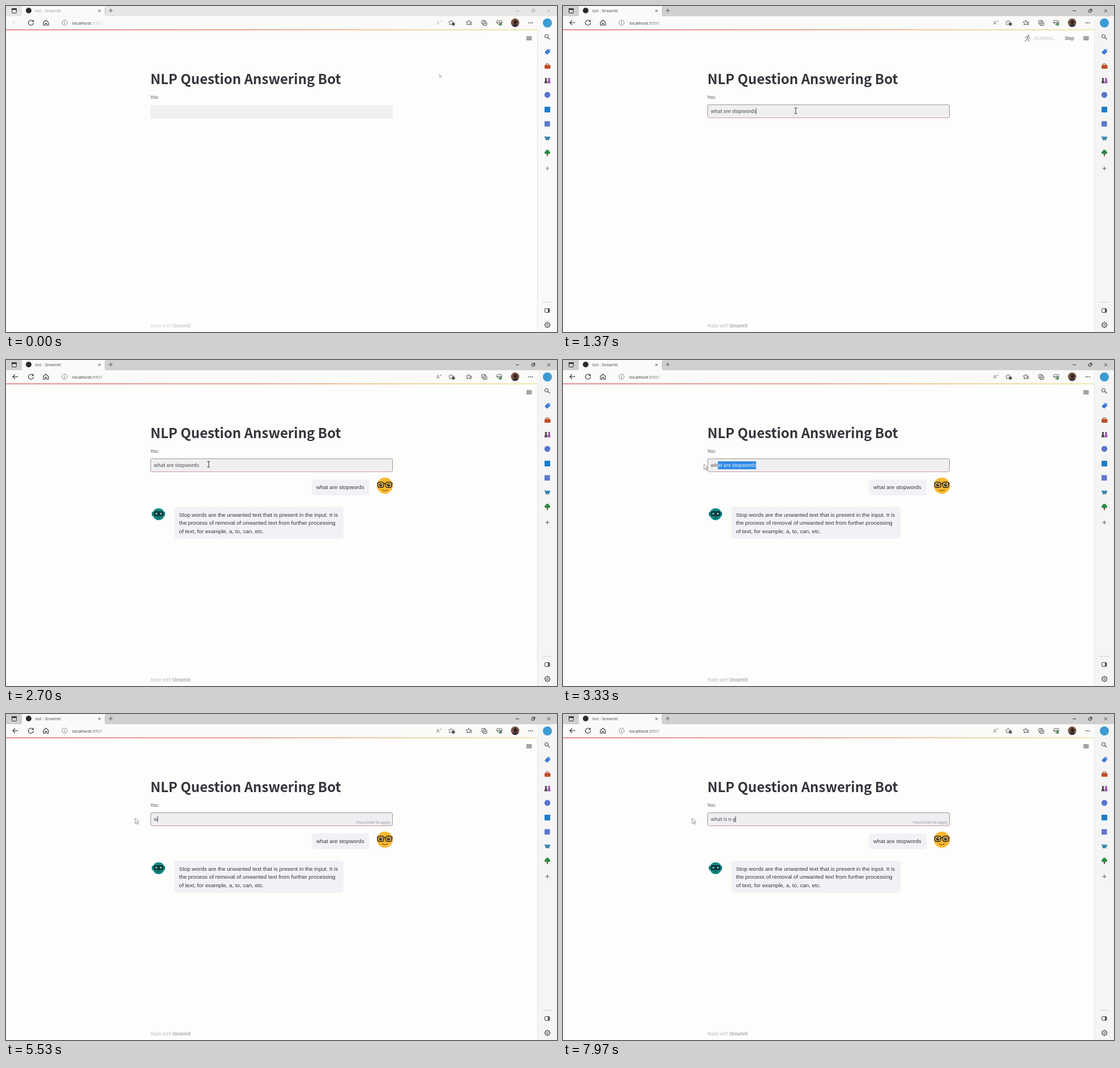
An HTML page with a canvas for the animation above (8 s loop, 973 by 576 pixels).

```html
<!DOCTYPE html>
<html lang="en">
<head>
<meta charset="utf-8">
<title>NLP Question Answering Bot</title>
<style>
html, body { margin: 0; width: 100%; height: 100%; overflow: hidden; background: #fdfdfc; }
canvas { display: block; width: 973px; height: 576px; }
</style>
</head>
<body>
<canvas id="stage" width="973" height="576"></canvas>
<script>
const W = 973, H = 576, LOOP = 8000;
const ctx = document.getElementById('stage').getContext('2d');
const UI = '"Open Sans", "Noto Sans", sans-serif';
const CHAT = '"Liberation Sans", Arial, sans-serif';
const INK = '#34343b', ICON = '#444', PAPER = '#fdfdfc';
const QUESTION = 'what are stopwords', NEXT = 'what is n-g';
const ANSWER = [
  'Stop words are the unwanted text that is present in the input. It is',
  'the process of removal of unwanted text from further processing',
  'of text, for example, a, to, can, etc.'
];
const ENTER = 690, REPLY = 2500, RETYPE = 5500;

// Page text: CSS pixels at the zoom of the recorded window.
const ZOOM = 0.546;
const pageFont = (px, weight = 'normal') =>
  `${weight} ${px * ZOOM}px "Noto Sans CJK SC", "Noto Sans CJK JP", "Noto Sans CJK", Lato, sans-serif`;
const INPUT_FONT = pageFont(16), SMALL_FONT = pageFont(14);

const clamp = (v, lo = 0, hi = 1) => Math.min(hi, Math.max(lo, v));
const ease = p => p * p * (3 - 2 * p);

// Eased value of [time, ...values] keys at time t.
function track(keys, t) {
  let i = 0;
  while (i < keys.length - 2 && t >= keys[i + 1][0]) i++;
  const [t0, ...a] = keys[i], [t1, ...b] = keys[i + 1];
  const p = ease(clamp((t - t0) / (t1 - t0)));
  return a.map((v, k) => v + (b[k] - v) * p);
}

const POINTER = [
  [0, 765, 120], [130, 765, 120], [320, 411, 185], [1500, 411, 185],
  [2000, 478, 178], [2300, 478, 178], [2800, 344, 185], [2950, 344, 185],
  [3330, 249, 184], [3550, 228, 184]
];
const SELECT = [[2950, 18], [3330, 2], [3420, 0]];

function rect(x, y, w, h, color) {
  ctx.fillStyle = color;
  ctx.fillRect(x, y, w, h);
}
function round(x, y, w, h, r, fill, stroke) {
  ctx.beginPath();
  ctx.roundRect(x, y, w, h, r);
  if (fill) { ctx.fillStyle = fill; ctx.fill(); }
  if (stroke) { ctx.strokeStyle = stroke; ctx.lineWidth = 1; ctx.stroke(); }
}
function disc(x, y, r, color) {
  ctx.beginPath();
  ctx.arc(x, y, r, 0, 7);
  ctx.fillStyle = color;
  ctx.fill();
}
function text(str, x, y, font, color) {
  ctx.font = font;
  ctx.fillStyle = color;
  ctx.fillText(str, x, y);
}
function textWidth(str, font) {
  ctx.font = font;
  return ctx.measureText(str).width;
}
// Path drawn around the point (x, y).
function shape(x, y, d, { fill, stroke, width = 1 }) {
  const p = new Path2D(d);
  ctx.save();
  ctx.translate(x, y);
  if (fill) { ctx.fillStyle = fill; ctx.fill(p); }
  if (stroke) { ctx.strokeStyle = stroke; ctx.lineWidth = width; ctx.stroke(p); }
  ctx.restore();
}
const line = (x, y, d, color = ICON, width = 1) => shape(x, y, d, { stroke: color, width });
const solid = (x, y, d, color) => shape(x, y, d, { fill: color });
function faded(alpha, draw) {
  ctx.save();
  ctx.globalAlpha *= alpha;
  draw();
  ctx.restore();
}

const STAR = 'M-1-4.5L.4-1.6L3.6-1.3L1.2.9L2 4L-1 2.4L-4 4L-3.2.9L-5.6-1.3L-2.4-1.6Z';
const CROSS = 'M-2.5-2.5L2.5 2.5M2.5-2.5L-2.5 2.5';
const PLUS = 'M-3.5 0H3.5M0-3.5V3.5';

function drawTabs(sharp) {
  const v = Math.round(230 - 22 * sharp);
  rect(0, 0, W, 18, `rgb(${v},${v},${v})`);
  round(28, -4, 147, 23, 3, '#fafaf8');
  rect(0, 18, W, 24, '#fafaf8');
  round(10.5, 4.5, 8, 8, 1.5, null, '#333');
  rect(10, 4, 9, 3, '#333');
  disc(40, 8, 5, '#2b2b2b');
  faded(0.5 + 0.5 * sharp, () => text('bot - Streamlit', 52, 10.7, '6.8px ' + UI, '#444'));
  line(165, 8.5, 'M-2-2L2 2M2-2L-2 2', '#444');
  rect(174.5, 3, 1, 12, '#bbb');
  line(185, 8, PLUS, '#555');
  faded(0.3 + 0.7 * sharp, () => {
    line(903, 8.5, 'M-3 0H3', '#333');
    line(931, 8.5, 'M-2.5-1.5H1.5V2.5H-2.5ZM-1-3H3V1', '#333');
    line(958.5, 8.5, CROSS, '#333');
  });
}

function drawToolbar(sharp) {
  faded(0.1 + 0.9 * sharp, () => line(16.5, 29.5, 'M5 0H-4.5M-.5-4L-4.5 0L-.5 4', '#333', 1.1));
  line(44, 29.5, 'M3.8-2.4A4.5 4.5 0 1 0 4.5 0M4.2-5V-2H1.2', '#333', 1.1);
  line(70.5, 29.5, 'M-4.5-.5L0-4.5L4.5-.5V4.5H1.3V1H-1.3V4.5H-4.5Z', '#333', 1.1);
  line(103.5, 29.5, 'M4.5 0A4.5 4.5 0 1 1-4.5 0A4.5 4.5 0 1 1 4.5 0M0-.8V2.4M0-2.6V-1.7', '#777', 0.9);
  const font = '8px ' + UI;
  text('localhost', 117, 32.5, font, '#333');
  faded(0.4 + 0.6 * sharp, () => text(':8501', 117 + textWidth('localhost', font), 32.5, font, '#777'));

  faded(0.4 + 0.6 * sharp, () => {
    text('A', 760, 33, '8.5px ' + UI, '#666');
    line(767.5, 27, 'M-1.8 1L0-1L1.8 1', '#666', 0.8);
  });
  line(787, 29.5, STAR, '#666', 0.9);
  disc(790, 32, 2.8, '#555');
  line(818, 29.5, STAR, '#444', 0.9);
  line(820, 30, 'M0 0H3M1 2.5H3', '#444');
  round(840, 25.5, 6.5, 6.5, 1.5, null, ICON);
  round(842.5, 28, 6.5, 6.5, 1.5, '#fafaf8', ICON);
  line(845.8, 31.2, 'M-2 0H2M0-2V2', ICON, 0.8);
  line(871, 29.5, 'M0 4.5L-4.2 0A2.4 2.4 0 0 1 0-3A2.4 2.4 0 0 1 4.2 0ZM-5 0H-1L0-1.5L1 1.5L2 0H5', ICON, 0.9);
  solid(873.5, 32.5, 'M-2-2H2V2H-2Z', '#3e8a4d');
  disc(899, 29.5, 7.4, '#7a5444');
  ctx.save();
  ctx.beginPath();
  ctx.arc(899, 29.5, 7.4, 0, 7);
  ctx.clip();
  disc(899.5, 28.5, 3.2, '#2d211f');
  solid(899.5, 38, 'M-6 0Q-6-6 0-6Q6-6 6 0Z', '#37313a');
  ctx.restore();
  for (const dx of [-3.2, 0, 3.2]) disc(926.5 + dx, 29.7, 0.9, '#333');
}

function drawSidebar(sharp) {
  const v = Math.round(249 - 4 * sharp);
  rect(938, 18, 35, H - 18, `rgb(${v},${v},${v})`);
  rect(938, 42, 1, H - 42, '#e2e2e4');
  disc(956, 30, 8, '#3c9bd5');
  line(955, 54, 'M2.5-.5A3 3 0 1 1-3.5-.5A3 3 0 1 1 2.5-.5M1.8 1.8L5.5 5', '#555', 1.2);
  solid(956, 81, 'M-5 1L0-4.5L4.5-5L5 0L-.5 5Z', '#3f78d8');
  disc(958.8, 78, 0.9, '#e8f0ff');
  round(953.5, 102, 5, 4, 1, null, '#8a3a22');
  round(951, 104, 10.5, 7, 1.5, '#cd5630');
  rect(951, 107, 10.5, 1, '#8a3a22');
  disc(953.5, 129, 2, '#52464b');
  solid(953.5, 131, 'M-1.5 0H1.5L3 5.5H-3Z', '#52464b');
  disc(959, 128.5, 1.8, '#9750a8');
  solid(959, 130, 'M-1.5 0H1.5L2.5 6.5H-2.5Z', '#9750a8');
  disc(956, 157, 5.2, '#5874cb');
  rect(951, 178, 10, 10, '#1b7ccb');
  rect(951, 203.5, 9.5, 9.5, '#5c78cc');
  solid(956, 234, 'M-5.5-3.5L5.5-3L2.5 4L-.5 2L-3 2Z', '#3f8fb8');
  solid(956, 234, 'M-3 2L5.5-3L-.5 2L-1 4Z', '#2f6b74');
  solid(956, 259, 'M0-5Q3-5 3-2.5Q5.5-1.5 5 1Q4 3 0 2.5Q-4 3-5 1Q-5.5-1.5-3-2.5Q-3-5 0-5Z', '#2b8a45');
  rect(955, 261, 2, 4, '#6a4a32');
  faded(0.5 + 0.5 * sharp, () => line(956, 287, 'M-3.5 0H3.5', '#555'));
  line(956, 287, 'M0-3.5V3.5', '#555');
  rect(947, 523, 18, 1, '#d2d2d4');
  round(951.5, 534.5, 8.5, 7, 1.5, null, ICON);
  rect(957, 535, 2.5, 6, ICON);
  ctx.save();
  ctx.translate(956, 563.5);
  for (let i = 0; i < 8; i++) {
    ctx.rotate(Math.PI / 4);
    rect(-1, -5.4, 2, 1.8, '#555');
  }
  ctx.restore();
  line(956, 563.5, 'M4 0A4 4 0 1 1-4 0A4 4 0 1 1 4 0M1.5 0A1.5 1.5 0 1 1-1.5 0A1.5 1.5 0 1 1 1.5 0', '#555');
}

function drawStatus(t) {
  for (const y of [54, 56.5, 59]) rect(919, y, 9.5, 1.2, '#444');
  if (t < ENTER || t >= REPLY) return;
  disc(822, 52, 1.5, '#8d8d92');
  line(820, 57, 'M1-3L-.5 1L2.5 3L2 6M-.5 1L-2 4L-5 5M1-3L-2.5-2.5L-4 0M1-3L3 0L5-.5', '#8d8d92', 1.3);
  text('RUNNING...', 832, 60, SMALL_FONT, '#c4c4c8');
  text('Stop', 886, 60, SMALL_FONT, INK);
}

// Input contents and the time of the latest key press.
function typing(t) {
  if (t < RETYPE) {
    const n = clamp(Math.floor((t - 360) / 16) + 1, 0, QUESTION.length);
    return { value: QUESTION.slice(0, n), last: 360 + Math.max(0, n - 1) * 16 };
  }
  const at = i => i < 8 ? RETYPE + i * 148 : 7200 + (i - 8) * 350;
  let n = 1;
  while (n < NEXT.length && t >= at(n)) n++;
  return { value: NEXT.slice(0, n), last: at(n - 1) };
}

function drawInput(t) {
  const focused = t >= 330;
  const { value, last } = typing(t);
  const edge = ctx.createLinearGradient(0, 174, 0, 198);
  edge.addColorStop(0, '#a3948f');
  edge.addColorStop(0.8, '#a89593');
  edge.addColorStop(1, '#cb9a9c');
  if (focused) round(255.5, 174.5, 427, 23, 2.5, '#efeff2', edge);
  else round(255, 175, 428, 24, 3, '#f0f0f3');
  text(value, 261, 189, INPUT_FONT, '#45454c');

  const selecting = t >= 2950 && t < RETYPE;
  if (selecting) {
    const from = Math.round(track(SELECT, t)[0]);
    const x0 = 261 + textWidth(value.slice(0, from), INPUT_FONT);
    const x1 = 261 + textWidth(value, INPUT_FONT);
    ctx.save();
    ctx.beginPath();
    ctx.rect(x0, 179, x1 - x0, 14);
    ctx.clip();
    rect(x0, 179, x1 - x0, 14, '#2f8ae4');
    text(value, 261, 189, INPUT_FONT, '#f4f8ff');
    ctx.restore();
  } else if (focused && (t - last) % 300 < 150) {
    rect(260.5 + textWidth(value, INPUT_FONT), 180, 0.8, 11, '#333');
  }
  if ((t >= 360 && t < ENTER) || t >= RETYPE) {
    text('Press Enter to apply', 618, 194.3, pageFont(12), '#92939d');
  }
}

function drawChat() {
  round(540, 211, 102, 28, 5, '#f2f2f6');
  text(QUESTION, 548, 228.3, '9.77px ' + CHAT, INK);
  disc(669, 222, 14.2, '#fab931');
  for (const x of [661.8, 675.8]) {
    round(x - 5.5, 215.5, 11, 10, 3, '#e9b550', '#2b241c');
    round(x - 5, 216, 10, 9, 2.5, null, '#2b241c');
    disc(x, 220.7, 2.7, '#2b241c');
    disc(x + 0.7, 220, 0.9, '#fff');
  }
  line(669, 219, 'M-2-.5H2M-14-1H-12M12-1H14', '#2b241c', 1.5);
  line(669, 229, 'M-5 0Q0 4 5 0', '#6a451a', 1.2);

  round(297, 259, 299, 57, 5, '#f2f2f6');
  ANSWER.forEach((row, i) => text(row, 305.5, 276.7 + i * 14.65, '9.77px ' + CHAT, INK));
  round(257.5, 268, 23.5, 8, 2, '#137b77');
  solid(269.5, 272, 'M-9.5-3Q-8-10 0-10Q8-10 9.5-3V5Q6 11 0 11Q-6 11-9.5 5Z', '#0f8c86');
  round(261, 267, 17, 9, 3, '#13383b');
  rect(264, 270, 3, 3, '#63c9c2');
  rect(272, 270, 3, 3, '#63c9c2');
  rect(266, 278, 7, 1.5, '#13504f');
}

function drawPointer(t) {
  const [x, y] = track(POINTER, t);
  const waiting = t > 1900 && t < 2350;
  const overInput = x > 255 && x < 683 && y > 174 && y < 198;
  if (overInput && !waiting) {
    line(x, y, 'M-2.5-5H2.5M0-5V5M-2.5 5H2.5', '#444', 1.1);
    return;
  }
  ctx.save();
  ctx.translate(x, y);
  if (t < 300) ctx.scale(0.6, 0.6);
  ctx.globalAlpha = waiting ? 0.65 : 1;
  shape(0, 0, 'M0 0V9.5L2.3 7.4L4 11L5.5 10.3L3.9 6.8H7Z', { fill: PAPER, stroke: '#85858c', width: 0.9 });
  ctx.restore();
}

function draw(t) {
  const sharp = clamp(t / 400);
  rect(0, 0, W, H, PAPER);
  drawTabs(sharp);
  drawToolbar(sharp);
  drawSidebar(sharp);

  const bar = ctx.createLinearGradient(0, 0, 938, 0);
  bar.addColorStop(0, '#e0646a');
  bar.addColorStop(0.45, '#e68068');
  bar.addColorStop(0.75, '#eec07f');
  bar.addColorStop(1, '#ece496');
  rect(0, 41.4, 938, 1.4, bar);
  drawStatus(t);

  // Page contents are dimmed while the script reruns.
  const dim = clamp((t - 650) / 100) * clamp((1300 - t) / 100);
  faded(1 - 0.2 * dim, () => {
    text('NLP Question Answering Bot', 255, 138, pageFont(44, 'bold'), INK);
    text('You:', 255, 164, SMALL_FONT, '#505058');
    drawInput(t);
  });
  if (t >= REPLY) drawChat();
  faded(0.6 + 0.4 * sharp, () => {
    text('Made with ', 255, 567.7, SMALL_FONT, '#b9b9be');
    text('Streamlit', 255 + textWidth('Made with ', SMALL_FONT), 567.7, SMALL_FONT, '#85868e');
  });
  drawPointer(t);
}

function frame() {
  draw(performance.now() % LOOP);
  requestAnimationFrame(frame);
}
frame();
</script>
</body>
</html>
```
